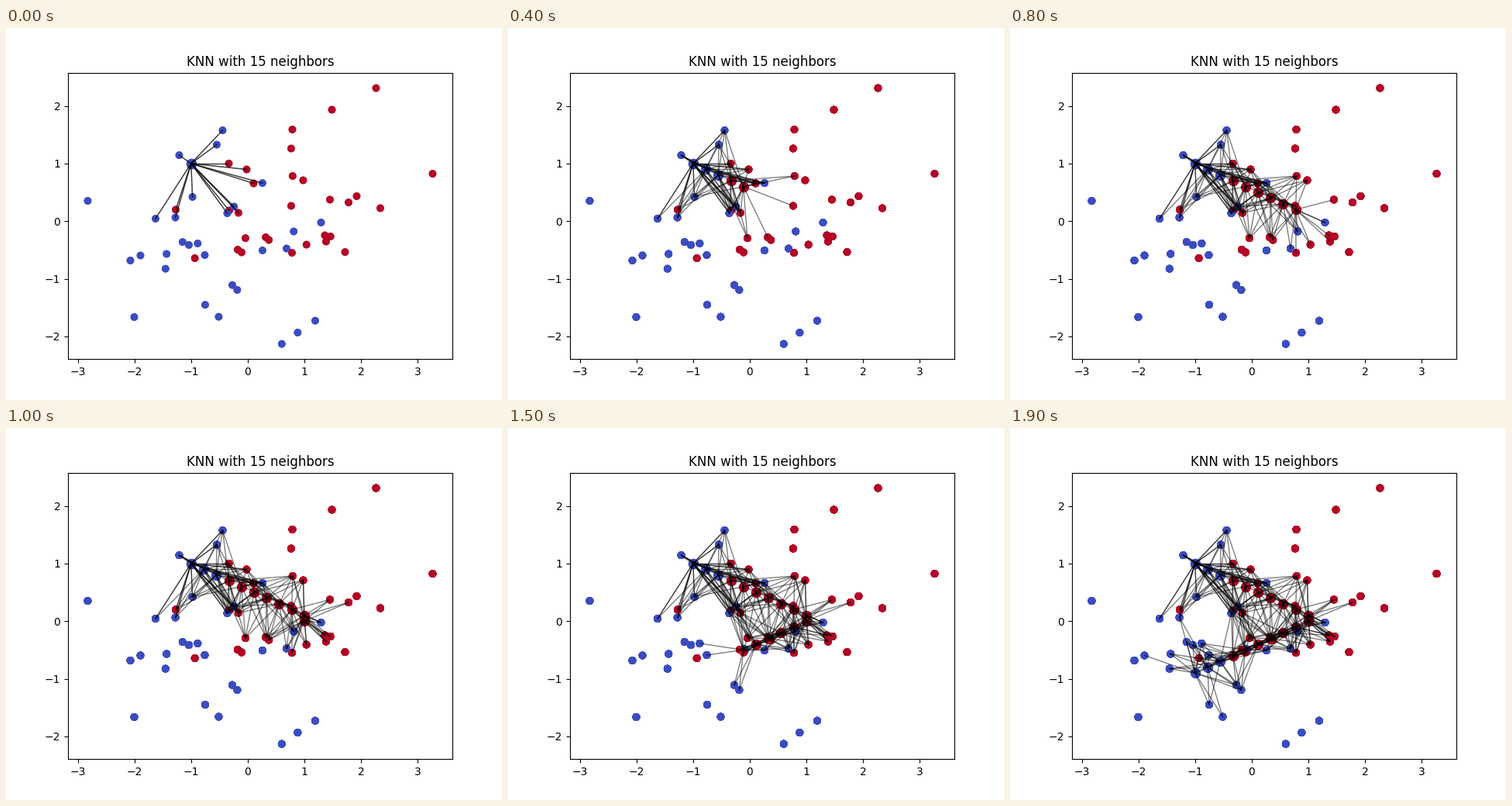
These frames come from a looping animation (640 by 480 pixels, 2 s). A matplotlib script:

```python
import numpy as np
import matplotlib.pyplot as plt
from matplotlib.animation import FuncAnimation

K = 15
STEPS = 20
BLUE, RED = "#3b4cc0", "#b40426"

red_pts = np.array([
    (2.265, 2.309), (1.486, 1.933), (0.788, 1.590), (0.767, 1.260), (3.264, 0.823),
    (-0.334, 1.000), (-0.019, 0.897), (0.104, 0.655), (0.792, 0.783), (0.979, 0.709),
    (1.923, 0.433), (1.451, 0.373), (1.780, 0.325), (2.341, 0.225), (0.767, 0.265),
    (-1.271, 0.198), (-0.327, 0.184), (-0.163, 0.144), (-0.040, -0.295), (0.318, -0.280),
    (0.374, -0.327), (1.037, -0.408), (1.362, -0.246), (1.462, -0.266), (1.383, -0.354),
    (0.781, -0.549), (1.718, -0.537), (-0.176, -0.495), (-0.108, -0.542), (-0.933, -0.643),
])
blue_pts = np.array([
    (-0.443, 1.576), (-0.546, 1.327), (-1.209, 1.144), (0.261, 0.660), (-0.975, 0.420),
    (-0.241, 0.252), (-0.361, 0.137), (-1.627, 0.043), (-1.276, 0.063), (-2.824, 0.352),
    (1.294, -0.024), (0.812, -0.179), (0.685, -0.475), (0.261, -0.508), (-1.150, -0.362),
    (-1.038, -0.414), (-0.883, -0.387), (-0.758, -0.589), (-1.432, -0.569), (-1.893, -0.596),
    (-2.071, -0.683), (-1.451, -0.826), (-2.003, -1.665), (-0.751, -1.452), (-0.512, -1.660),
    (-0.272, -1.109), (-0.185, -1.194), (1.191, -1.728), (0.882, -1.934), (0.601, -2.131),
])
points = np.vstack([red_pts, blue_pts])
is_red = np.arange(len(points)) < len(red_pts)
colors = np.where(is_red, RED, BLUE)

# The query runs right along one slanted line, then back left along another.
sweep = np.linspace(-1, 1, STEPS // 2)
path_x = np.concatenate([sweep, sweep[::-1]])
path_y = 1 - 0.1 * np.arange(STEPS)

fig, ax = plt.subplots(figsize=(6.4, 4.8), dpi=100)
ax.set_xlim(-3.172, 3.613)
ax.set_ylim(-2.394, 2.577)
ax.set_title(f"KNN with {K} neighbors")


def add_layer(step):
    """Draw one query with its vote, the data over it, and the neighbor links."""
    x, y = path_x[step], path_y[step]
    near = np.argsort(np.hypot(points[:, 0] - x, points[:, 1] - y))[:K]
    vote = RED if is_red[near].sum() > K / 2 else BLUE
    query = ax.scatter(x, y, s=75, c=vote)
    data = ax.scatter(points[:, 0], points[:, 1], c=colors)
    links = ax.plot([np.full(K, x), points[near, 0]],
                    [np.full(K, y), points[near, 1]],
                    "k-", lw=1, alpha=0.5)
    return [query, data, *links]


layers = [add_layer(step) for step in range(STEPS)]
layers[0] += add_layer(0)  # the first query is laid down twice


def update(frame):
    for step, layer in enumerate(layers):
        for artist in layer:
            artist.set_visible(step <= frame)
    return []


anim = FuncAnimation(fig, update, frames=STEPS, interval=100, repeat=True)
plt.show()
```
